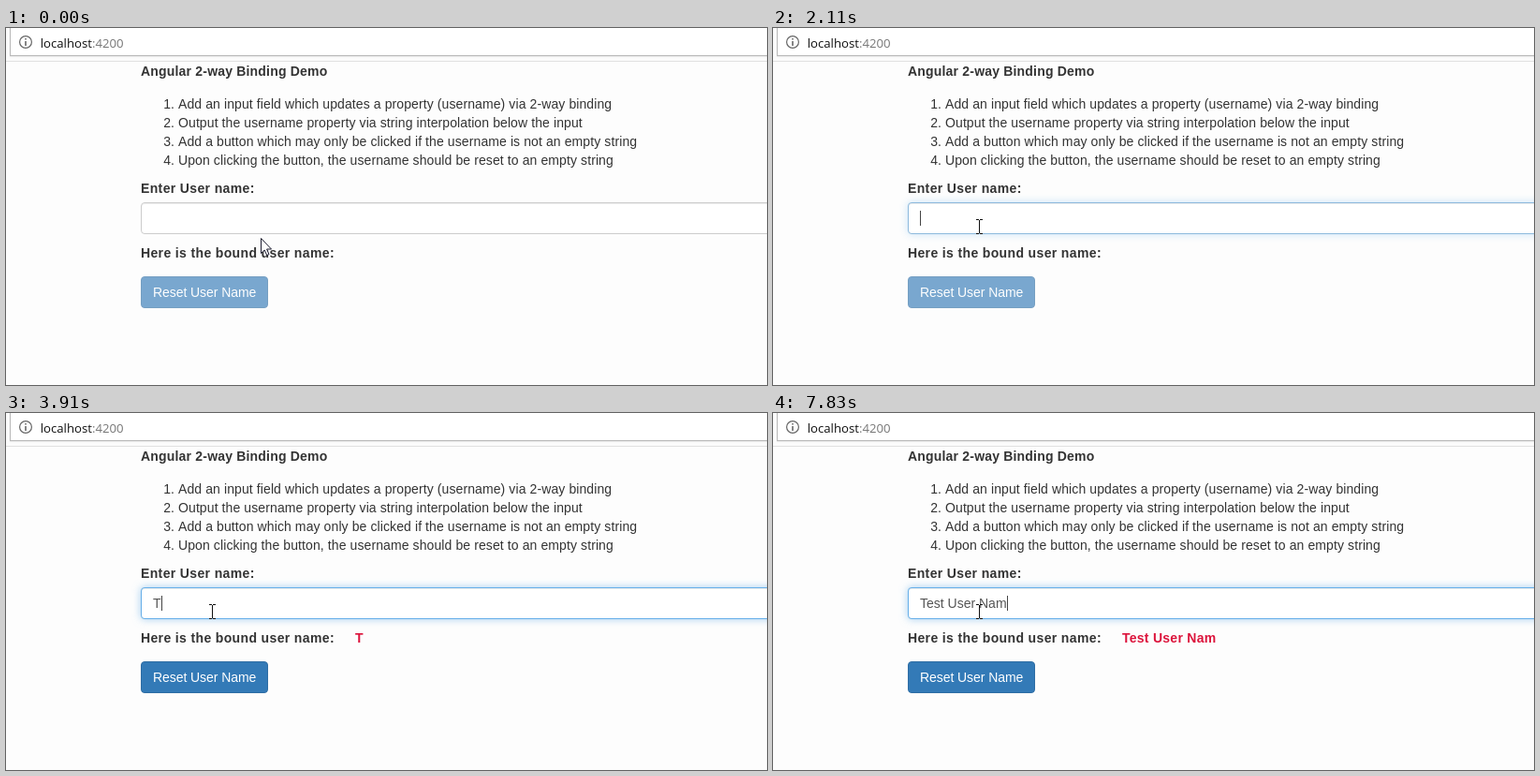
Write an HTML page that moves like this. It is 813 by 381 pixels and loops after 7990 ms.

```html
<!DOCTYPE html>
<html lang="en">
<head>
<meta charset="utf-8">
<title>Two-way binding demo</title>
<style>
html, body { margin: 0; width: 100%; height: 100%; overflow: hidden; }
body { position: relative; background: #fdfdfd; color: #333; font: 14px/20px "Liberation Sans", Arial, sans-serif; }
body * { box-sizing: border-box; }
.at, svg { position: absolute; white-space: pre; }
b.at { left: 144px; letter-spacing: .36px; }
b.title { top: 36px; letter-spacing: .19px; }
.bar { left: 0; top: 0; width: 813px; height: 36px; background: #fbfbfb; border-bottom: 1px solid #e1e1e1; }
.url { left: 4px; top: -4px; width: 820px; height: 34px; background: #fff; border: 1px solid #b9b9b9; box-shadow: 0 1px 1px rgba(0,0,0,.06); }
.host { left: 36.7px; top: 6px; font: 13.2px/20px "Open Sans", "Noto Sans", sans-serif; color: #111; }
.host span { color: #777; }
ol { margin: 0; padding: 0; left: 184px; top: 71px; letter-spacing: .1px; }
.field { left: 144px; top: 186px; width: 720px; height: 34px; background: #fff; border: 1px solid #ccc; border-radius: 4px; box-shadow: inset 0 1px 1px rgba(0,0,0,.075); }
#glow { border-color: #66afe9; box-shadow: inset 0 1px 1px rgba(0,0,0,.075), 0 0 8px rgba(102,175,233,.6); }
#typed { left: 157px; top: 193px; color: #555; }
#caret { top: 195px; width: 1px; height: 16px; background: #444; }
b#bound { left: 373px; top: 230px; color: #dc143c; letter-spacing: .26px; }
#reset { left: 144px; top: 265px; width: 136px; height: 34px; padding: 6px 12px; color: #fff; background: #337ab7; border: 1px solid #2e6da4; border-radius: 4px; letter-spacing: -.07px; }
svg { left: 0; top: 0; overflow: visible; }
</style>
</head>
<body>
<div class="at bar"></div>
<div class="at url"></div>
<svg width="30" height="30" fill="none" stroke="#666">
  <circle cx="21" cy="15" r="6.4" stroke-width="1.2"/>
  <path d="M21 14v5M21 11v1.6" stroke-width="1.6"/>
</svg>
<div class="at host">localhost<span>:4200</span></div>

<b class="at title">Angular 2-way Binding Demo</b>
<ol class="at"><li>Add an input field which updates a property (username) via 2-way binding</li><li>Output the username property via string interpolation below the input</li><li>Add a button which may only be clicked if the username is not an empty string</li><li>Upon clicking the button, the username should be reset to an empty string</li></ol>
<b class="at" style="top:161px">Enter User name:</b>
<div class="at field"></div>
<div class="at field" id="glow"></div>
<div class="at" id="typed"></div>
<div class="at" id="caret"></div>
<b class="at" style="top:230px">Here is the bound user name:</b>
<b class="at" id="bound"></b>
<div class="at" id="reset">Reset User Name</div>

<svg id="arrow" width="12" height="20"><path d="M.5 .5V16.5L4.2 13 6.7 18.6 9 17.6 6.6 12H11.5Z" fill="#fff" stroke="#1c1c30"/></svg>
<svg id="beam" width="7" height="16"><path d="M0 .5H3M4 .5H7M3.5 1V15M0 15.5H3M4 15.5H7" fill="none" stroke="#111"/></svg>

<script>
const LOOP = 7990;
const MOVE_STEP = 137.5, KEY_STEP = 145;
const FOCUS_AT = 2110, FADE = 150;
const BLINK = 1020, BLINK_ON = 460;

// typing comes in bursts of evenly spaced keys
const bursts = [["T", 3910], ["est ", 4210], ["U", 5310], ["ser", 6620], [" Nam", 7190]];
const keys = bursts.flatMap(([text, at]) =>
  [...text].map((char, i) => ({ char, at: at + i * KEY_STEP })));

const $ = id => document.getElementById(id);
const [glow, typed, caret, bound, reset, arrow, beam] =
  ["glow", "typed", "caret", "bound", "reset", "arrow", "beam"].map($);
const show = (el, on) => { el.style.visibility = on ? "visible" : "hidden"; };
const lerp = (a, b, p) => a + (b - a) * p;
const glide = (a, b, p) => a.map((v, i) => lerp(v, b[i], p));

// a wide counterclockwise circle
function sweep(n) {
  const angle = lerp(-0.91, -2 * Math.PI - 0.15, n / 8);
  const size = Math.min(1, 0.81 + n * 0.1);
  return [215 + 114 * size * Math.cos(angle), 272 + 75 * size * Math.sin(angle)];
}

// circle the page, pass the label, stop in the field
function pointer(n) {
  const label = [285, 233], field = [217, 204];
  if (n <= 8) return sweep(n);
  if (n <= 11) return glide(sweep(8), label, (n - 8) / 3);
  return glide(label, field, (n - 11) / 2);
}

function draw(t) {
  const n = Math.min(13, Math.max(0, Math.floor((t - 10) / MOVE_STEP)));
  const [x, y] = pointer(n).map(Math.round);
  const inField = n === 13;
  show(arrow, !inField);
  show(beam, inField);
  (inField ? beam : arrow).style.transform = `translate(${x}px, ${y}px)`;

  const focused = t >= FOCUS_AT;
  glow.style.opacity = !focused ? 0 : t < FOCUS_AT + FADE ? 0.6 : 1;

  const done = keys.filter(k => k.at <= t);
  typed.textContent = bound.textContent = done.map(k => k.char).join("");
  reset.style.opacity = done.length ? 1 : 0.65;

  // every key restarts the blink
  const since = t - (done.length ? done.at(-1).at : FOCUS_AT);
  show(caret, focused && since % BLINK < BLINK_ON);
  caret.style.left = 157 + typed.offsetWidth + "px";
}

const start = performance.now();
function tick() {
  draw((performance.now() - start) % LOOP);
  requestAnimationFrame(tick);
}
draw(0);
requestAnimationFrame(tick);
</script>
</body>
</html>
```
